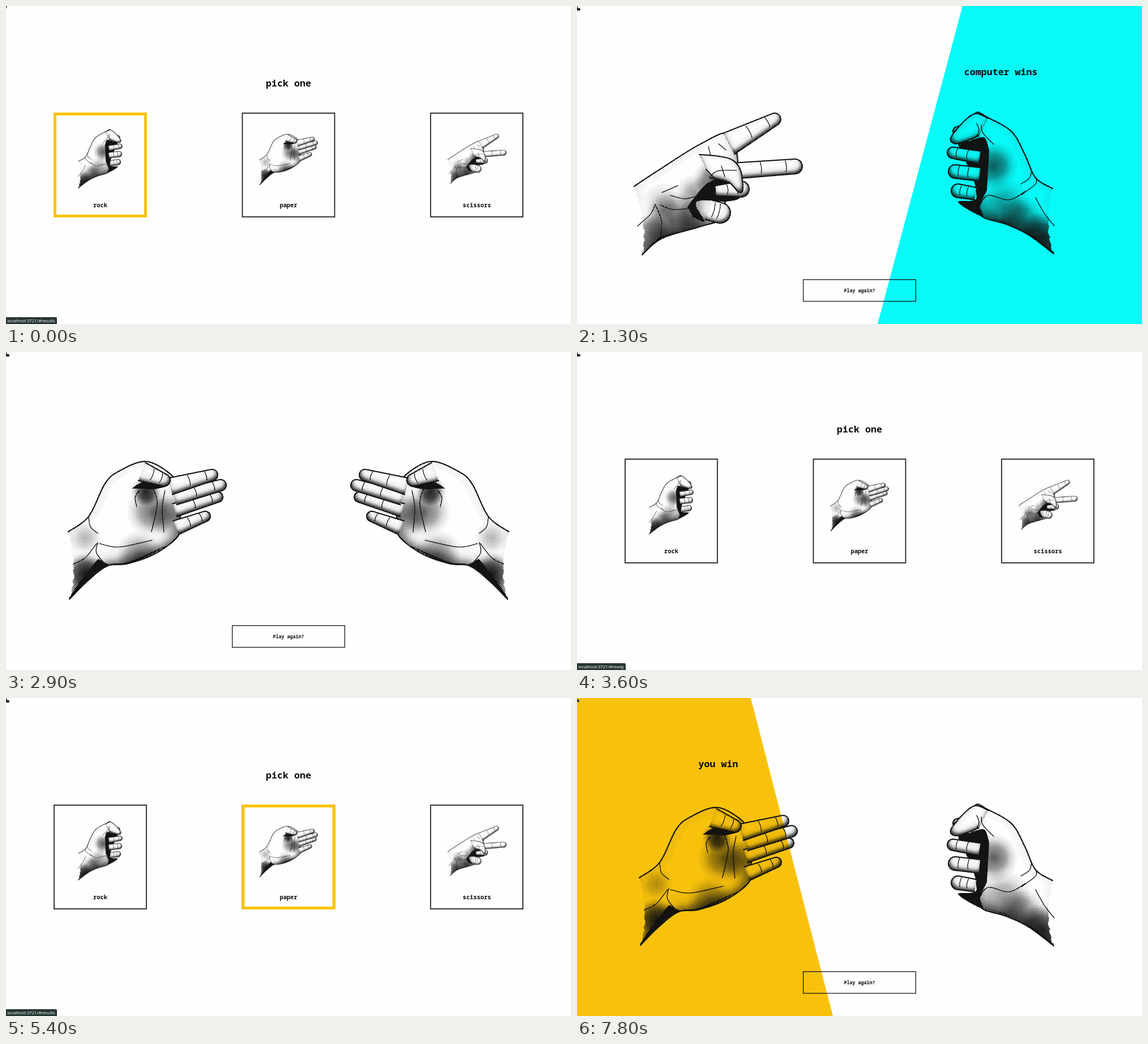
These frames come from a looping animation (998x561 px, 8.6 s). An HTML page with a canvas:

```html
<!DOCTYPE html>
<html lang="en">
<head>
<meta charset="utf-8">
<title>rock paper scissors</title>
<style>
html, body { margin: 0; width: 100%; height: 100%; overflow: hidden; background: #fefefe; }
svg, canvas { position: absolute; left: 0; top: 0; width: 998px; height: 561px; }
text { font: bold 16.64px "Roboto Mono", "Noto Sans Mono", "DejaVu Sans Mono", monospace; text-anchor: middle; fill: #0c0c0c; }
.label { font-size: 10.4px; }
.small { font-size: 8.32px; }
.card, .button { fill: none; stroke: #161616; stroke-width: 1.7; }
.button { stroke-width: 1.3; }
#tip text { font: 7.75px "Open Sans", "Noto Sans", sans-serif; text-anchor: start; fill: #fff; }
</style>
</head>
<body>
<svg viewBox="0 0 998 561">
  <g id="pick">
    <text x="499" y="142">pick one</text>
    <rect class="card" x="85" y="189" width="163" height="183"/>
    <rect class="card" x="417.5" y="189" width="163" height="183"/>
    <rect class="card" x="750" y="189" width="163" height="183"/>
    <text class="label" x="166.5" y="355">rock</text>
    <text class="label" x="499" y="355">paper</text>
    <text class="label" x="831.7" y="355">scissors</text>
    <rect id="hover" y="190.5" width="160" height="180" fill="none" stroke="#fcc30b" stroke-width="5"/>
  </g>
  <g id="result">
    <g id="you">
      <path d="M0 0H307L452 561H0Z" fill="#f8c20c"/>
      <text x="249.5" y="122">you win</text>
    </g>
    <g id="computer">
      <path d="M681 0H998V561H531Z" fill="#08faf8"/>
      <text x="748.7" y="122">computer wins</text>
    </g>
    <rect class="button" x="399.7" y="482.7" width="198.7" height="38.3"/>
    <text class="small" x="499" y="505">Play again?</text>
  </g>
  <g id="tip">
    <path id="tipBox" fill="#243633"/>
    <text id="tipText" x="2.4" y="558"></text>
  </g>
  <path id="arrow" d="M0 .5L5.3 5.5 3.3 5.8 4.3 8.2 3 8.7 2 6.4 .3 7.7Z" fill="#111" stroke="#fff" stroke-width=".4"/>
  <path id="pointer" d="M0 0H1V3L5 4Q6.5 4.3 6 7L5 8H0Z" fill="#252525"/>
</svg>
<canvas id="stage" width="998" height="561"></canvas>
<script>
const $ = id => document.getElementById(id);
const W = 412, H = 445, S = 2, INK = '#101010';

// Open curve through points written as "x,y x,y"
function curve(text) {
  const pts = text.split(' ').map(p => p.split(',').map(Number)), last = pts.length - 1;
  const at = i => pts[Math.max(0, Math.min(last, i))];
  const path = new Path2D();
  path.moveTo(...pts[0]);
  for (let i = 0; i < last; i++) {
    const [a, b, c, d] = [at(i - 1), at(i), at(i + 1), at(i + 2)];
    path.bezierCurveTo(b[0] + (c[0] - a[0]) / 6, b[1] + (c[1] - a[1]) / 6,
      c[0] - (d[0] - b[0]) / 6, c[1] - (d[1] - b[1]) / 6, ...c);
  }
  return path;
}

// Tapered finger from base (x, y, r) to tip (u, v, q), open at the base
function finger(x, y, r, u, v, q) {
  const turn = Math.atan2(v - y, u - x), side = turn - Math.PI / 2;
  const nx = Math.cos(side), ny = Math.sin(side), path = new Path2D(), creases = new Path2D();
  path.moveTo(x + nx * r, y + ny * r);
  path.arc(u, v, q, side, side + Math.PI);
  path.lineTo(x - nx * r, y - ny * r);
  for (const f of [.45, .85]) {
    const cx = x + (u - x) * f, cy = y + (v - y) * f, k = (r + (q - r) * f) * .6;
    creases.moveTo(cx + nx * k * 1.4, cy + ny * k * 1.4);
    creases.quadraticCurveTo(cx + 3, cy, cx - nx * k, cy - ny * k);
  }
  return { path, creases };
}
const pad = text => ({ path: curve(text) });

// card: scale and offset when small; spots: soft shadows x, y, radius, darkness
const rock = {
  card: [.4145, 62.8, 140.2],
  body: '158,322 188,303 207,262 230,222 272,197 295,190 300,240 290,345 283,371 240,385 200,404 156,437',
  spots: [[262, 282, 42, .6], [245, 355, 50, .45], [176, 408, 46, .8], [212, 378, 42, .5]],
  ink: ['270,255 279,232 305,238 325,243 300,300 293,340 325,346 283,371 286,352 274,325', '283,369 215,393 156,437 190,407 240,381'],
  parts: [
    finger(287, 267, 11, 334, 259, 10), finger(287, 297, 12, 330, 292, 12), finger(294, 331, 11, 325, 326, 12),
    finger(300, 214, 8, 326, 221, 8), pad('272,198 295,190 318,207 338,233 330,243 310,238 288,229'),
  ],
  folds: ['188,302 188,314 213,333', '195,290 199,304 214,314', '206,327 235,342 271,334 286,350', '292,207 288,219 292,230', '284,210 281,224 262,244', '155,388 173,365 188,338'],
};
const paper = {
  card: [.369, 406.9, 154.8],
  body: '110,317 146,290 175,232 200,210 247,193 290,215 303,240 308,300 303,326 265,355 220,372 180,377 145,403 112,436',
  spots: [[258, 282, 44, .55], [235, 358, 42, .5], [140, 390, 38, .85], [247, 246, 26, .8], [292, 290, 40, .45], [140, 328, 28, .35]],
  ink: ['163,365 185,375 220,369 283,342 220,373 168,382 112,436 140,392', '222,241 245,229 285,235 262,242 236,241'],
  parts: [
    finger(300, 310, 13, 352, 290, 9), finger(298, 279, 12, 374, 256, 9), finger(298, 258, 12, 379, 235, 10),
    finger(290, 237, 15, 364, 217, 10), finger(240, 211, 17, 279, 226, 11),
  ],
  folds: ['260,240 267,268 257,317', '281,244 276,275 279,318', '165,338 200,344 258,332', '146,290 149,308 162,320', '162,336 160,355 178,377', '235,245 228,257 231,273', '119,374 140,363 160,338'],
};
const scissors = {
  card: [.349, 744.8, 160],
  body: '101,318 142,291 217,244 270,225 285,280 285,320 262,345 268,372 215,390 150,410 115,439',
  spots: [[168, 378, 52, .6], [130, 402, 36, .55], [240, 305, 34, .6], [208, 332, 34, .45], [205, 374, 32, .5], [150, 345, 32, .25]],
  ink: ['195,354 229,314 262,303 278,318 288,338 262,345 220,343 210,352 225,380 205,372', '215,388 151,408 115,439 145,409 190,395'],
  parts: [
    finger(268, 243, 21, 349, 200, 11), finger(275, 291, 14, 385, 283, 13), finger(230, 359, 18, 253, 365, 18),
    finger(245, 326, 9, 290, 323, 14), pad('216,262 250,265 275,272 289,290 293,324 285,328 268,311 235,303'),
  ],
  folds: ['232,248 236,263', '250,243 263,254', '107,388 130,367 138,350', '138,350 149,378 148,409', '147,351 170,359 200,357', '235,301 249,291 282,290', '228,288 246,307', '255,282 261,301', '165,334 190,340 213,335', '150,329 178,317'],
};

function halftone(g) {
  const w = W * S, h = H * S, img = g.getImageData(0, 0, w, h), d = img.data;
  for (let y = 0, i = 3; y < h; y++) for (let x = 0; x < w; x++, i += 4) {
    const screen = .48 + .22 * (Math.cos((x + y) * .89) + Math.cos((x - y) * .89));
    d[i] = d[i] && 255 * Math.max(0, Math.min(1, (d[i] / 255 - screen) * 2.4 + .5));
    d[i - 1] = d[i - 2] = d[i - 3] = 16;
  }
  g.putImageData(img, 0, 0);
}

function engrave({ body, spots, ink, parts, folds }) {
  const c = document.createElement('canvas');
  c.width = W * S;
  c.height = H * S;
  const g = c.getContext('2d', { willReadFrequently: true });
  let seed = 7;
  const random = () => (seed = seed * 16807 % 2147483647) / 2147483647;
  const line = (path, width) => { g.lineWidth = width; g.stroke(path); };
  const erase = path => {
    g.globalCompositeOperation = 'destination-out';
    g.fill(path);
    g.globalCompositeOperation = 'source-over';
  };

  // Light falls from the upper left: shade the far inner rim
  function form(path, depth, dark, spots = []) {
    erase(path);
    const rim = new Path2D();
    rim.rect(-100, -100, W + 200, H + 200);
    rim.addPath(path);
    g.save();
    g.clip(path);
    for (const [x, y, r, strength] of spots) {
      const glow = g.createRadialGradient(x, y, 0, x, y, r);
      glow.addColorStop(0, `rgba(16,16,16,${strength})`);
      glow.addColorStop(.5, `rgba(16,16,16,${strength * .7})`);
      glow.addColorStop(1, 'rgba(16,16,16,0)');
      g.fillStyle = glow;
      g.fillRect(0, 0, W, H);
    }
    g.fillStyle = INK;
    g.globalAlpha = dark;
    g.filter = `blur(${depth * S}px)`;
    g.translate(-depth * .5, -depth);
    g.fill(rim, 'evenodd');
    g.restore();
  }

  // Torn wrist between the two ends of the outline
  function tear() {
    const pts = body.split(' ').map(p => p.split(',').map(Number));
    const [a, b] = [pts[0], pts.at(-1)];
    for (let f = .06; f < .96; f += .03) {
      const spot = new Path2D();
      spot.arc(a[0] + (b[0] - a[0]) * f, a[1] + (b[1] - a[1]) * f, 2 + Math.sin(Math.PI * f) * 9 * random(), 0, 7);
      erase(spot);
    }
  }

  g.scale(S, S);
  g.fillStyle = g.strokeStyle = INK;
  g.lineCap = g.lineJoin = 'round';
  const palm = curve(body);
  form(palm, 9, .6, spots);
  tear();
  line(palm, 2.1);
  ink.forEach(p => g.fill(curve(p)));
  for (const { path, creases } of parts) {
    form(path, 4.5, .85);
    line(path, 2);
    if (creases) line(creases, 1.2);
  }
  folds.forEach(p => line(curve(p), 1.3));
  halftone(g);
  return c;
}

const hands = [rock, paper, scissors], prints = hands.map(engrave);
const ctx = $('stage').getContext('2d');
ctx.imageSmoothingQuality = 'high';

function drawHand(i, sx, sy, x, y) {
  ctx.setTransform(sx, 0, 0, sy, x, y);
  ctx.drawImage(prints[i], 0, 0, W, H);
}

// Times of choosing, hovering and playing, then both hands
const rounds = [
  [-400, -100, 100, 0, 0],
  [400, 800, 1300, 2, 0],
  [2100, 2500, 2700, 1, 1],
  [3500, 4000, 4100, 0, 1],
  [5200, 5400, 5600, 1, 0],
];
const show = (id, on) => $(id).style.display = on ? '' : 'none';
const move = (id, x, y) => $(id).setAttribute('transform', `translate(${x} ${y})`);

function drawHands(played, you, cpu) {
  ctx.setTransform(1, 0, 0, 1, 0, 0);
  ctx.clearRect(0, 0, 998, 561);
  if (played) {
    drawHand(you, 1, 1, 0, 0);
    drawHand(cpu, -1, 1, 998, 0);
  } else hands.forEach(({ card: [k, x, y] }, i) => drawHand(i, k, k, x, y));
}

function drawTip(hovered, age) {
  const alpha = age < 200 ? 1 : hovered && age < 300 ? .55 : 0;
  $('tip').setAttribute('opacity', alpha);
  $('tipText').textContent = 'localhost:3721/' + (hovered ? '#results' : '#ready');
  $('tipBox').setAttribute('d', `M0 549H${hovered ? 88 : 84}q2 0 2 2V561H0Z`);
}

let drawn;
function tick() {
  const t = performance.now() % 8600;
  const [choose, hover, play, you, cpu] = rounds.findLast(r => r[0] <= t);
  const played = t >= play, hovered = t >= hover, outcome = (you - cpu + 3) % 3;
  show('pick', !played);
  show('result', played);
  show('hover', hovered && !played);
  show('you', played && outcome === 1);
  show('computer', played && outcome === 2);
  $('hover').setAttribute('x', 86.5 + 332.5 * you);
  drawTip(hovered, t - (hovered ? hover : choose));
  const view = [played, you, cpu].join();
  if (view !== drawn) {
    drawHands(played, you, cpu);
    drawn = view;
  }
  const arrow = t < 100 || t >= 6400;
  show('arrow', arrow);
  show('pointer', !arrow);
  move('arrow', t < 100 ? -2.5 : 0, t < 100 ? -4.5 : 0);
  move('pointer', t < 5800 ? 0 : -.8, t < 5800 ? 0 : -.6);
  requestAnimationFrame(tick);
}
tick();
</script>
</body>
</html>
```
